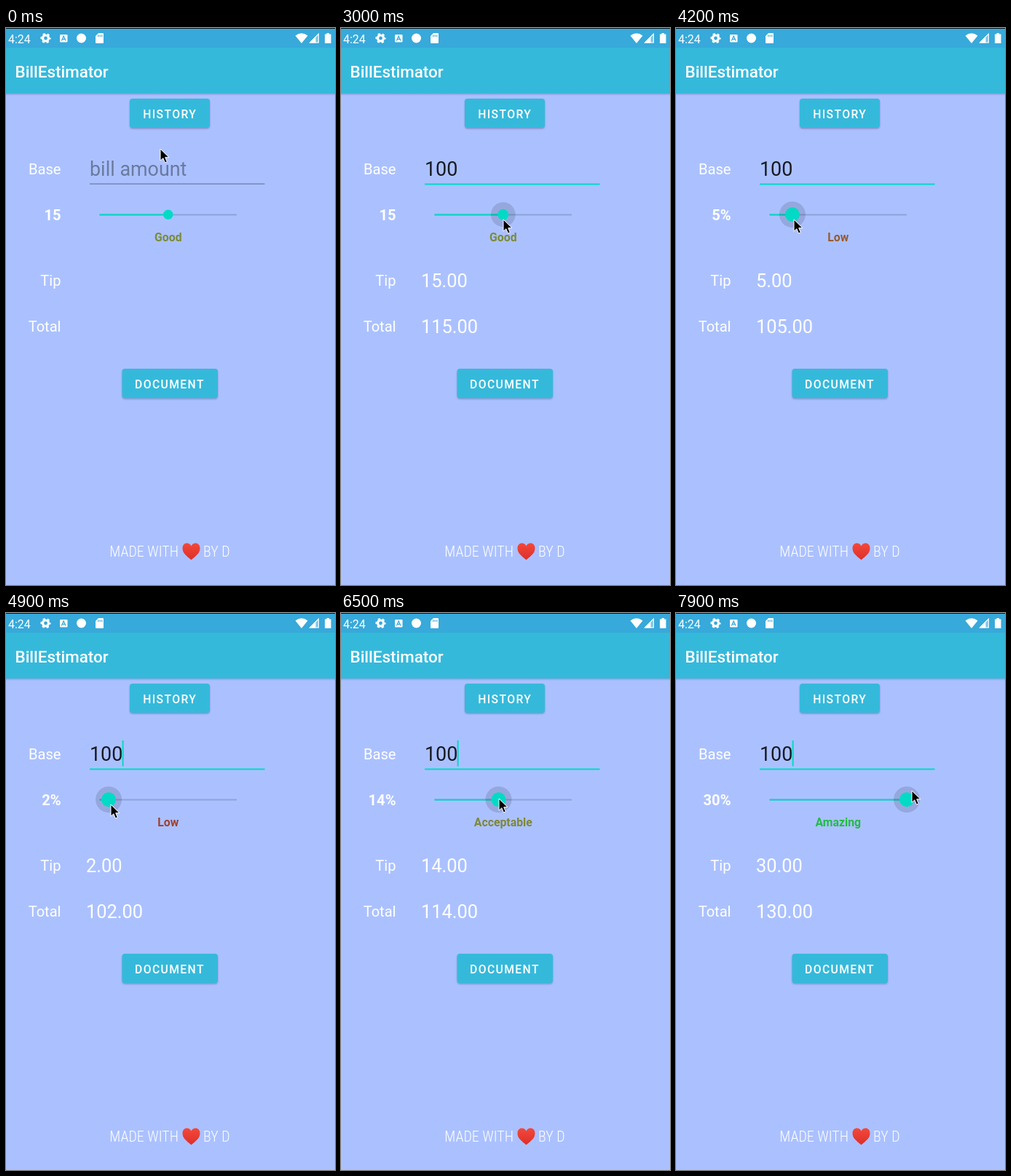
Recreate the animation shown at these times as an HTML page. Size 452x765 px, loop 8 s.

```html
<!DOCTYPE html>
<html lang="en">
<head>
<meta charset="utf-8">
<title>BillEstimator</title>
<style>
  html, body { margin: 0; width: 100%; height: 100%; overflow: hidden; background: #abc1ff; }
  svg { display: block; font-family: Roboto, sans-serif; }
  .white { fill: #fff; }
  .label { font-size: 20.1px; fill: #fff; text-anchor: end; }
  .bold { font-weight: 700; }
  .field { font-size: 26.9px; }
  .result { font-size: 25.4px; fill: #fff; }
  .button { font-size: 15.7px; font-weight: 500; letter-spacing: 1.4px; fill: #fff; }
  .footer { font: 300 20px "Roboto Condensed", Roboto, sans-serif; font-stretch: 75%; fill: #fff; }
</style>
</head>
<body>
<svg width="452" height="765" viewBox="0 0 452 765">
  <defs>
    <linearGradient id="shade" x2="0" y2="1">
      <stop stop-color="#47609a" stop-opacity=".35"/>
      <stop offset="1" stop-color="#47609a" stop-opacity="0"/>
    </linearGradient>
    <linearGradient id="red" x2="0" y2="1">
      <stop stop-color="#f4483a"/>
      <stop offset="1" stop-color="#dc2f2a"/>
    </linearGradient>
    <filter id="lift" x="-10%" y="-20%" width="120%" height="150%">
      <feDropShadow dx="0" dy="1.4" stdDeviation="1" flood-color="#31497f" flood-opacity=".45"/>
    </filter>
  </defs>

  <rect width="452" height="765" fill="#abc1ff"/>
  <rect y="90" width="452" height="3" fill="url(#shade)"/>
  <rect width="452" height="90" fill="#35b9db"/>
  <rect width="452" height="27" fill="#37a9da"/>
  <rect width="452" height="1" fill="#111"/>

  <!-- status bar -->
  <g class="white">
    <text x="3" y="21" font-size="16">4:24</text>
    <g fill="none" stroke="#fff">
      <circle cx="54.5" cy="14" r="4" stroke-width="3.2"/>
      <circle cx="54.5" cy="14" r="6.1" stroke-width="2" stroke-dasharray="3.2 3.19" stroke-dashoffset="1.6"/>
    </g>
    <rect x="74" y="9" width="10.5" height="10.5" rx="1.3"/>
    <path d="M76.4 17.4 79.2 11 82 17.4M77.4 15.4H81" fill="none" stroke="#37a9da" stroke-width="1.2"/>
    <circle cx="103.5" cy="14" r="6.5"/>
    <path d="M127 7H133Q134 7 134 8V20Q134 21 133 21H124Q123 21 123 20V11Z"/>
    <path d="M126.7 9.5V12M129.2 9.5V12M131.7 9.5V12" stroke="#37a9da" stroke-width="1.2"/>
    <path d="M397.5 10.5Q406 4 414.5 10.5L406 21Z"/>
    <path d="M430 7V20.500H416.500Z" opacity=".35"/>
    <path d="M425.500 11.500V20.500H416.500Z"/>
    <path d="M429.400 8.200V20H417.700Z" fill="none" stroke="#fff" stroke-width="1.1"/>
    <path d="M440.500 7H444V8.500H446.500V21H438V8.500H440.500Z"/>
  </g>
  <text class="white" x="12.500" y="68" font-size="22.4" font-weight="500">BillEstimator</text>

  <g fill="#35b9db" filter="url(#lift)">
    <rect x="170" y="97" width="110" height="40" rx="4"/>
    <rect x="159.500" y="468" width="131.500" height="40.300" rx="4"/>
  </g>
  <text class="button" x="188.200" y="124">HISTORY</text>
  <text class="button" x="177" y="495">DOCUMENT</text>

  <text class="label" x="75.500" y="201">Base</text>
  <text class="label" x="75.500" y="354">Tip</text>
  <text class="label" x="75.500" y="416.500">Total</text>
  <text class="label bold" id="percent" x="75.500" y="264"></text>

  <text class="field" id="base" x="115" y="203"></text>
  <rect id="line" x="115" y="213.500" width="240.500"/>
  <rect id="caret" y="175" width="2" height="35.500" fill="#03dac5"/>

  <rect x="128.500" y="255.500" width="188.500" height="2" fill="#8da3da"/>
  <rect id="track" x="128.500" y="255.500" height="2" fill="#03dac5"/>
  <circle id="halo" cy="256.200" fill="#000" fill-opacity=".13"/>
  <circle id="thumb" cy="256.200" fill="#03dac5"/>
  <text class="bold" id="mood" x="222.800" y="293" font-size="15.8" text-anchor="middle"></text>

  <text class="result" id="tip" x="110" y="356"></text>
  <text class="result" id="total" x="110" y="418.500"></text>

  <text class="footer" x="237" y="725.500" text-anchor="end">MADE WITH</text>
  <text class="footer" x="271" y="725.500">BY D</text>
  <path d="M254.500 730.500C248 725 242.500 721.500 242.500 714.500C242.500 706 252 705.500 254.500 711.500C257 705.500 266.500 706 266.500 714.500C266.500 721.500 261 725 254.500 730.500Z" fill="url(#red)"/>

  <path id="cursor" d="M1 1V17.200L4.800 13.800 7.400 20 10.300 18.800 7.700 12.700H13Z" fill="#000" stroke="#fff" stroke-width="1" stroke-linejoin="round"/>
</svg>
<script>
const LOOP = 8000, STEP = 100;
const LEFT = 128.5, UNIT = 188.5 / 30;
const PRESS = 2800;

// time, x, y of the pointer
const path = [
  [0, 211, 165], [200, 215, 174], [500, 206, 197], [1800, 206, 197],
  [2200, 225, 271], [2300, 226, 270], [2400, 226, 270], [2600, 222, 262],
  [3100, 222, 262], [3600, 193, 263], [4200, 161, 262], [4500, 152, 262],
  [5000, 141, 262], [5100, 141, 262], [5700, 157, 261], [6000, 172, 260],
  [6500, 216, 254], [6900, 244, 251], [7800, 312, 245], [7900, 323, 243]
];
const typed = [[1400, "100"], [1300, "10"], [1000, "1"], [0, ""]];
const moods = [[25, "Amazing"], [20, "Great"], [15, "Good"], [10, "Acceptable"], [0, "Low"]];
const worst = [165, 42, 42], best = [34, 187, 68];

const parts = {};
document.querySelectorAll("[id]").forEach(e => parts[e.id] = e);
const set = (id, attrs) => {
  for (const k in attrs) parts[id].setAttribute(k, attrs[k]);
};
const write = (id, text) => { parts[id].textContent = text; };
const clamp = (v, a, b) => Math.min(b, Math.max(a, v));
const mix = (a, b, k) => a + (b - a) * k;
const pick = (table, v) => table.find(row => v >= row[0])[1];

function pointer(t) {
  const i = path.findIndex(p => p[0] >= t);
  if (i <= 0) return path[0].slice(1);
  const a = path[i - 1], b = path[i], k = (t - a[0]) / (b[0] - a[0]);
  return [mix(a[1], b[1], k), mix(a[2], b[2], k)];
}

// gamma-aware blend from worst to best
function moodColor(k) {
  const rgb = worst.map((w, i) =>
    Math.round(mix(w ** 2.2, best[i] ** 2.2, k) ** (1 / 2.2)));
  return `rgb(${rgb})`;
}

function draw(t) {
  const [x, y] = pointer(t);
  const pressed = t >= PRESS;
  const value = pressed ? clamp(Math.round((x - 1 - LEFT) / UNIT), 0, 30) : 15;
  const text = pick(typed, t);
  const focused = t >= 1000;
  const money = n => text ? n.toFixed(2) : "";

  set("cursor", { transform: `translate(${Math.round(x)} ${Math.round(y)})` });

  write("base", text || "bill amount");
  set("base", { fill: text ? "#171a24" : "#6a7a9f" });
  set("line", focused
    ? { height: 2, fill: "#03dac5" }
    : { height: 1.2, fill: "#6a7a9f" });
  const lit = focused && (t < 1900 || t >= 2500 && t % 1000 >= 500);
  set("caret", { x: 114.3 + text.length * 15.1, visibility: lit ? "visible" : "hidden" });

  const cx = LEFT + value * UNIT;
  const grow = clamp((t - PRESS + 100) / 400, 0, 1);
  set("track", { width: cx - LEFT });
  set("thumb", { cx, r: mix(6.7, 10, clamp((t - 2900) / 400, 0, 1)) });
  set("halo", { cx, r: pressed ? 18 * (1 - (1 - grow) ** 2) : 0 });

  write("percent", value + (value === 15 && t < 3300 ? "" : "%"));
  write("mood", pick(moods, value));
  set("mood", { fill: moodColor(value / 30) });

  const base = Number(text), tip = base * value / 100;
  write("tip", money(tip));
  write("total", money(base + tip));
}

const start = performance.now();
function tick() {
  const t = (performance.now() - start) % LOOP;
  draw(Math.floor(t / STEP) * STEP);
  requestAnimationFrame(tick);
}
tick();
</script>
</body>
</html>
```
